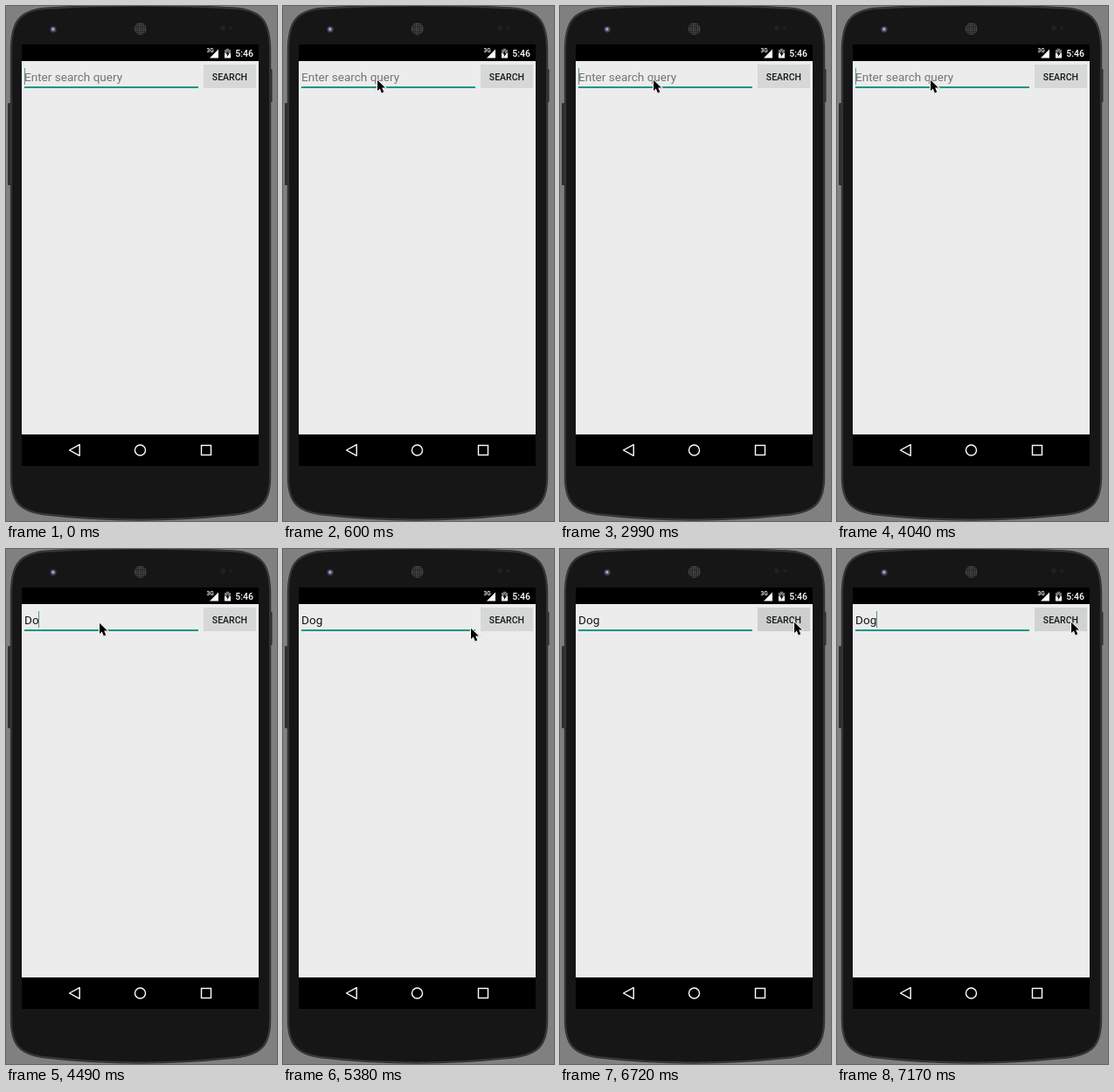
Recreate the animation shown at these times as an HTML page. Size 310 by 589 pixels, loop 8 s.

```html
<!DOCTYPE html>
<html lang="en">
<head>
<meta charset="utf-8">
<title>Search field</title>
<style>
  html, body { margin: 0; width: 100%; height: 100%; overflow: hidden; background: #808080; }
  svg { display: block; width: 310px; height: 589px; }
  text { font-family: Roboto, sans-serif; }
  .field { font-size: 13.55px; fill: #161616; }
  .hint { fill: #747474; }
  .label { font-size: 10.54px; font-weight: 500; }
  .step { animation: 8s step-end infinite; }

  .hint { animation-name: hint; }
  .d { animation-name: type-d; }
  .o { animation-name: type-o; }
  .g { animation-name: type-g; }
  .caret { animation-name: blink; }
  .caret rect { animation-name: advance; }
  .button { animation-name: press; }
  .pointer { animation-name: move; }

  @keyframes hint { 0% { opacity: 1 } 54.25%, 100% { opacity: 0 } }
  @keyframes type-d { 0% { fill-opacity: 0 } 54.25%, 100% { fill-opacity: 1 } }
  @keyframes type-o { 0% { fill-opacity: 0 } 56.125%, 100% { fill-opacity: 1 } }
  @keyframes type-g { 0% { fill-opacity: 0 } 59.875%, 100% { fill-opacity: 1 } }

  @keyframes blink {
    0%, 13%, 26.125%, 37.375%, 50.5%, 71%, 89.625%, 100% { opacity: 1 }
    5.625%, 18.625%, 31.75%, 44.875%, 65.375%, 82.125% { opacity: 0 }
  }
  @keyframes advance {
    0% { transform: translateX(21px) }
    54.25% { transform: translateX(29px) }
    56.125% { transform: translateX(37px) }
    59.875%, 100% { transform: translateX(45px) }
  }
  @keyframes press {
    0% { fill: #d6d8d7; filter: drop-shadow(0 .8px .6px #0006) }
    76.5% { fill: #cccfce; filter: drop-shadow(0 1.2px 1.2px #0007) }
    82.125% { fill: #cccfce; filter: drop-shadow(0 1px .7px #0006) }
    84% { fill: #cccfce; filter: drop-shadow(0 .8px .6px #0006) }
    85.875%, 100% { fill: #d1d3d2; filter: drop-shadow(0 .8px .6px #0006) }
  }
  @keyframes move {
    0% { transform: translate(-40px, 0) }
    3.75% { transform: translate(211px, 169px) }
    5.625% { transform: translate(131px, 112px) }
    7.5% { transform: translate(106px, 83px) }
    9.375% { transform: translate(105px, 83px) }
    67.25% { transform: translate(213px, 89px) }
    69.125% { transform: translate(257px, 89px) }
    71%, 100% { transform: translate(266px, 82px) }
  }
</style>
</head>
<body>
<svg viewBox="0 0 310 589">
  <defs>
    <pattern id="mesh" width="2.4" height="2.4" patternUnits="userSpaceOnUse">
      <rect width="2.4" height="2.4" fill="#1b1b1b"/>
      <circle cx="1.2" cy="1.2" r=".8" fill="#686868"/>
    </pattern>
    <path id="body" d="M6 52C6 20 14 6.5 42 3Q153-4 266 3C294 6.5 302 20 302 52V538C302 566 293 577 266 581Q153 594 42 581C15 577 6 566 6 538Z"/>
  </defs>

  <!-- Phone -->
  <rect width="310" height="589" fill="#808080"/>
  <rect x="2" y="111" width="5" height="94" rx="1" fill="#303030"/>
  <rect x="300" y="72" width="4.5" height="38" rx="1" fill="#303030"/>
  <use href="#body" fill="#161616" stroke="#2a2a2a" stroke-width="2.4"/>
  <use href="#body" fill="none" stroke="#444" stroke-width=".8"/>
  <circle cx="54" cy="26.8" r="4" fill="#2c2c36"/>
  <circle cx="54" cy="26.8" r="2.7" fill="#5e5e80"/>
  <circle cx="53.8" cy="26.4" r="1.2" fill="#c4c4da"/>
  <circle cx="153.7" cy="26" r="7" fill="url(#mesh)"/>
  <circle cx="248" cy="25" r="3" fill="#202020"/>
  <circle cx="257" cy="25" r="2" fill="#202020"/>

  <!-- Screen and system bars -->
  <rect x="18" y="44" width="271" height="482"/>
  <rect x="18" y="63" width="271" height="427" fill="#ececec"/>
  <g fill="#fff">
    <path d="M243 49.5V59.5H233Z"/>
    <text x="229.6" y="53" font-size="6.6" font-weight="500">3G</text>
    <path d="M250 50H252V48.7H255V50H257V54H250Z" fill="#777"/>
    <path d="M250 54H257V59.5H250Z"/>
    <path d="M254.4 51L251.4 55.2H253.2L252.6 58.5L255.7 54.1H253.8Z" fill="#000"/>
    <text class="label" x="262.3" y="57.8">5:46</text>
  </g>
  <g fill="none" stroke="#fff" stroke-width="1.4">
    <path d="M72.5 508L84.2 501.7V514.3Z" stroke-linejoin="round"/>
    <circle cx="153.5" cy="508" r="6"/>
    <rect x="223.5" y="502.5" width="11" height="11"/>
  </g>

  <!-- Search form -->
  <text class="field hint step" x="21" y="86">Enter search query</text>
  <text class="field" x="21" y="86"><tspan class="d step">D</tspan><tspan class="o step">o</tspan><tspan class="g step">g</tspan></text>
  <rect x="21" y="92" width="199" height="2" fill="#129588"/>
  <g class="caret step"><rect class="step" y="71" width="1" height="19" fill="#5f8f8a"/></g>
  <rect class="button step" x="226" y="67" width="60" height="27" rx="1.5"/>
  <text class="label" x="235.8" y="85" fill="#171717">SEARCH</text>

  <g class="pointer step">
    <path d="M2 1.8V14L4.8 11.4L6.9 16.4L9.3 15.3L7.2 10.5H11Z" stroke="#fff" stroke-width="2" paint-order="stroke" style="filter: drop-shadow(0 .7px .6px #0006)"/>
  </g>
</svg>
</body>
</html>
```
